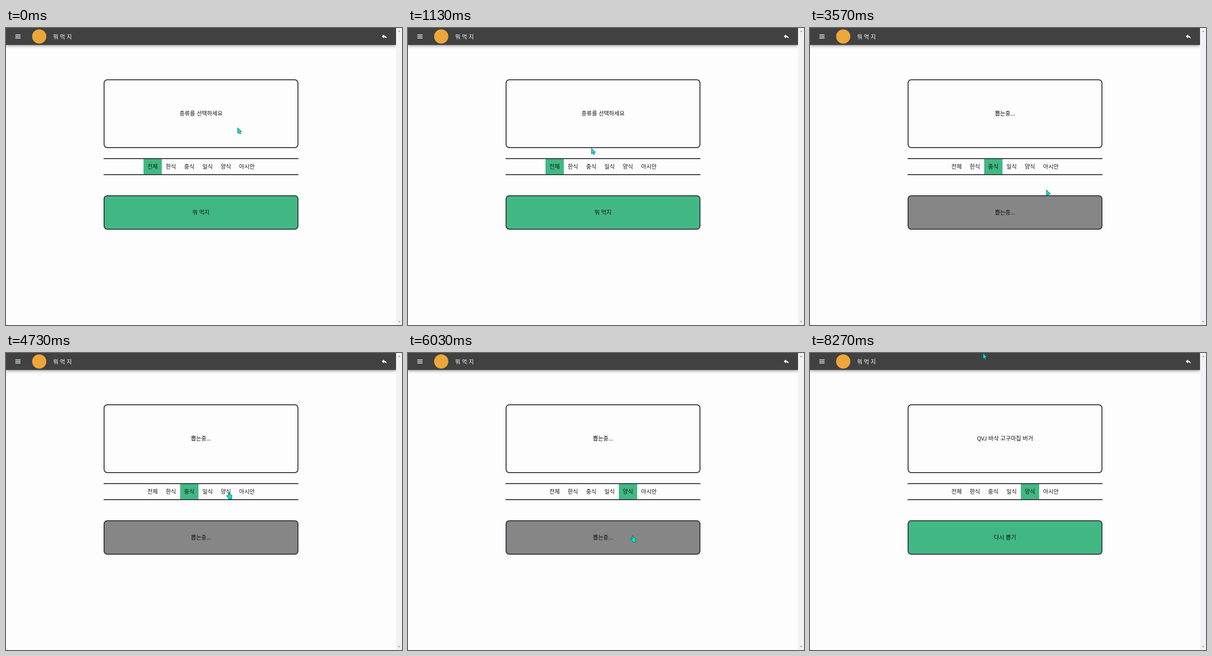
Write an HTML page that moves like this. It is 864 by 648 pixels and loops after 8.34 s.

```html
<!DOCTYPE html>
<html lang="ko">
<head>
<meta charset="utf-8">
<title>뭐 먹지</title>
<style>
  html, body { margin: 0; width: 100%; height: 100%; overflow: hidden; background: #fdfdfd; }
  body { font: 300 12.3px "Noto Sans CJK KR", "Noto Sans CJK", "Noto Sans KR", sans-serif; color: #111; }
  header, .row, svg { position: absolute; box-sizing: border-box; }
  header, .row, .tab { display: flex; align-items: center; }
  header {
    width: 851px; height: 37px; padding: 0 0 1px 103px;
    background: #414141; color: #fff; font-size: 12px; letter-spacing: .2px;
    box-shadow: 0 2px 4px -1px #0003, 0 4px 5px #0002, 0 1px 10px #0002;
  }
  .row { left: 213px; width: 425px; justify-content: center; border: 2px solid #2f3138; }
  #result, #button { padding-bottom: 2px; border-radius: 8px; }
  #result { top: 112px; height: 150px; }
  #tabs { top: 284px; height: 37px; border-width: 2px 0; }
  .tab { height: 100%; box-sizing: border-box; padding: 0 8.7px 2px; }
  #button { top: 365px; height: 75px; }
  #button, .on { background: #41b883; }
  #button.busy { background: #868686; }
  svg { left: 0; top: 0; pointer-events: none; }
  #cursor { fill: #00e6d2; stroke: #1c4a4c; stroke-width: .9; stroke-linejoin: round; }
  #hand, .over #arrow { display: none; }
  .over #hand { display: inline; }
</style>
</head>
<body>
<header>뭐 먹 지</header>
<div id="result" class="row"></div>
<div id="tabs" class="row"></div>
<div id="button" class="row hot"></div>
<svg width="864" height="648" viewBox="0 0 864 648">
  <path d="M20.5 14.9h11.2m-11.2 3.5h11.2m-11.2 3.500h11.2" stroke="#fff" stroke-width="1.5"/>
  <circle cx="72.5" cy="18.5" r="15.5" fill="#eda63a"/>
  <path fill="#fff" transform="translate(818.2 10.9) scale(.62)"
    d="M10 9V5l-7 7 7 7v-4.1c5 0 8.500 1.600 11 5.100-1-5-4-10-11-11z"/>
  <rect x="851" width="13" height="648" fill="#f2f2f4"/>
  <path d="M855 8.500l3-3 3 3zM855 639.500l3 3 3-3z" fill="#a0a0a4"/>
  <g id="cursor">
    <path id="arrow" d="M.5.5V12.800L3.200 10.400 5.200 14.200 7.200 13.200 5.500 9.500 9 9.200Z"/>
    <path id="hand" d="M0 1.500Q1.200-.4 2.400 1.500V5.600L7.200 6.800Q8.400 7.300 8.200 8.800L7.300 12.800V15.600H.6V13.600L-3.600 9.500Q-4.200 7.500-2.400 7.700L0 9.400Z"/>
  </g>
</svg>
<script>
const LOOP = 8340, DRAW_TIME = 2000;
const DRAWING = '뽑는중...';
const names = ['전체', '한식', '중식', '일식', '양식', '아시안'];
const $ = id => document.getElementById(id);

// The pointer rests between moves
const home = { x: 505, y: 217 };
const moves = [
  { from: 70, to: 830, x: 400, y: 254 },
  { from: 970, to: 1570, x: 400, y: 300 },
  { from: 2100, to: 2330, x: 443, y: 349 },
  { from: 2600, to: 3270, x: 470, y: 401 },
  { from: 3370, to: 3830, x: 582, y: 282 },
  { from: 3830, to: 4730, x: 485, y: 303 },
  { from: 5500, to: 6030, x: 489, y: 397 },
  { from: 6330, to: 6800, x: 481, y: 365 },
  { from: 7070, to: 7270, x: 465, y: 354 },
  { from: 7430, to: 8270, x: 377, y: 0 }
];
const picks = [{ at: 0, name: '전체' }, { at: 1900, name: '중식' }, { at: 5500, name: '양식' }];
const draws = [{ at: 3000, food: '짜장면' }, { at: 5960, food: 'QVJ 바삭 고구마칩 버거' }];

$('tabs').innerHTML = names.map(name => `<div class="tab hot">${name}</div>`).join('');

const last = (list, t) => list.findLast(item => item.at <= t);

function pointer(t) {
  let { x, y } = home;
  for (const move of moves) {
    const u = Math.min(1, Math.max(0, (t - move.from) / (move.to - move.from)));
    const k = u * u * (3 - 2 * u);
    x += (move.x - x) * k;
    y += (move.y - y) * k;
  }
  return [x, y];
}

function labels(t) {
  const draw = last(draws, t);
  if (!draw) return ['종류를 선택하세요', '뭐 먹지'];
  return t < draw.at + DRAW_TIME ? [DRAWING, DRAWING] : [draw.food, '다시 뽑기'];
}

function render(t) {
  const [result, label] = labels(t);
  $('result').textContent = result;
  $('button').textContent = label;
  $('button').classList.toggle('busy', label === DRAWING);

  const picked = last(picks, t).name;
  for (const tab of $('tabs').children) tab.classList.toggle('on', tab.textContent === picked);

  const [x, y] = pointer(t);
  const over = document.elementFromPoint(x, y)?.closest('.hot');
  $('cursor').setAttribute('transform', `translate(${x} ${y})`);
  $('cursor').classList.toggle('over', Boolean(over));
}

const start = performance.now();
function tick() {
  render((performance.now() - start) % LOOP);
  requestAnimationFrame(tick);
}
tick();
</script>
</body>
</html>
```
